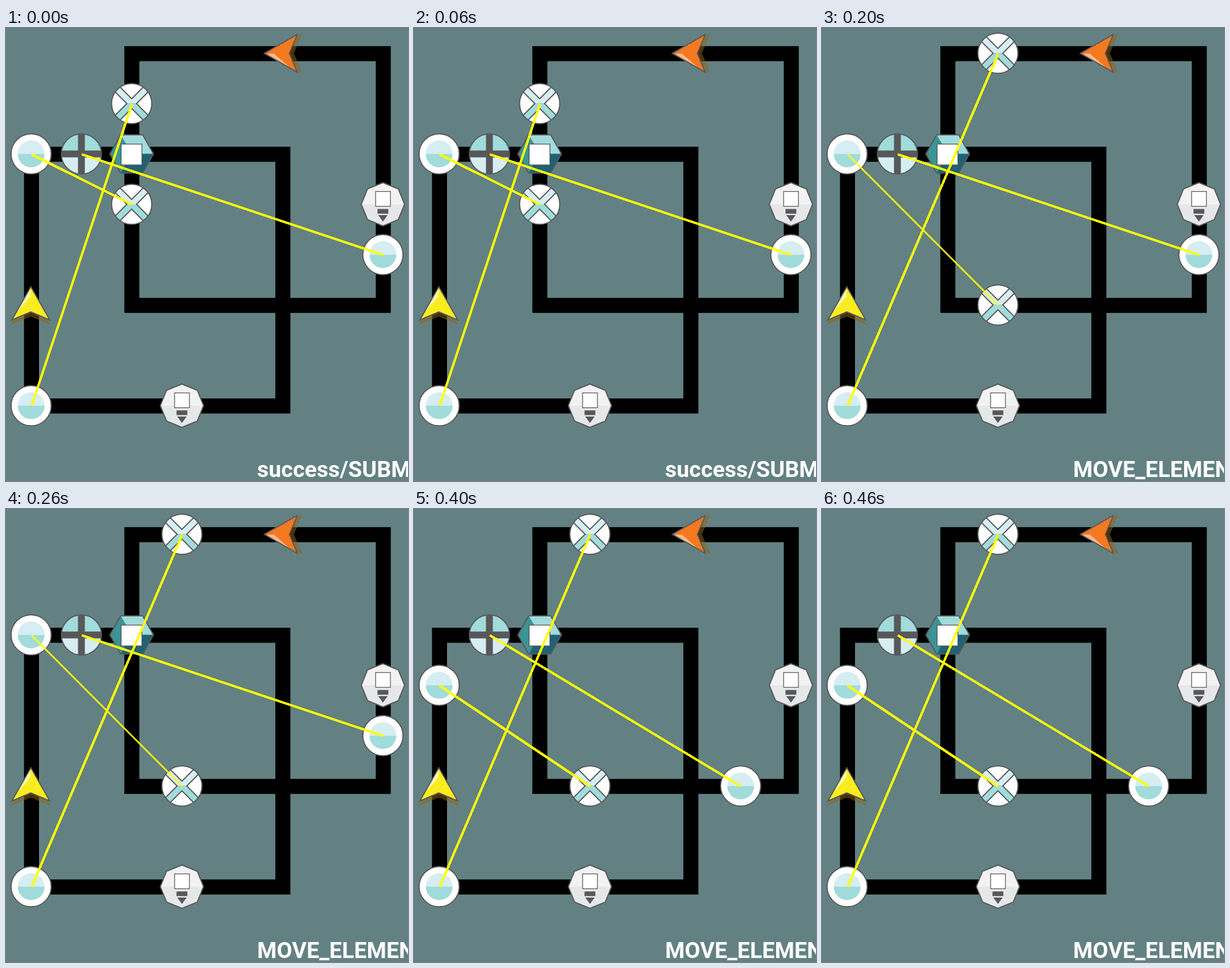
Animation, 706 px wide and 794 px high, one loop 0.5 s. Source, as an HTML page:

```html
<!DOCTYPE html>
<html lang="en">
<head>
<meta charset="utf-8">
<title>Moving elements</title>
<style>
  html, body { margin: 0; width: 100%; height: 100%; overflow: hidden; background: #638183; }
  svg { display: block; width: 706px; height: 794px; }
  text { font: 700 39.4px Roboto, sans-serif; fill: #fff; }
  .edge { stroke: #58585a; stroke-width: 2; }
  .none { fill: none; }
  .pale { fill: #d5edf3; }
  .aqua { fill: #a1dbdb; }
  .dark { fill: #58585a; }
  .white { fill: #fff; }
</style>
</head>
<body>
<svg viewBox="0 0 706 794">
  <defs>
    <clipPath id="disc"><circle r="35.3"/></clipPath>
    <clipPath id="upper"><rect x="-40" y="-40" width="80" height="40"/></clipPath>
    <clipPath id="lower"><rect x="-40" width="80" height="40"/></clipPath>
    <path id="x" d="M-30-30L30 30M30-30L-30 30"/>
    <path id="dart" d="M0 0L33.2 58L0 44L-33.2 58Z"/>

    <g id="bubble">
      <circle class="white edge" r="35.3"/>
      <path class="pale" d="M-23.6 0A23.6 23.6 0 0 1 23.6 0Z"/>
      <path class="aqua" d="M-23.6 0A23.6 23.6 0 0 0 23.6 0Z"/>
    </g>
    <g id="plus">
      <path class="aqua" d="M-35.3 0A35.3 35.3 0 0 1 35.3 0Z"/>
      <path class="pale" d="M-35.3 0A35.3 35.3 0 0 0 35.3 0Z"/>
      <path class="dark" d="M-35-6H35V6H-35ZM-6-35H6V35H-6Z"/>
      <circle class="none edge" r="35.3"/>
    </g>
    <g id="cross">
      <circle class="white" r="35.3"/>
      <g clip-path="url(#disc)">
        <use href="#x" stroke="#58585a" stroke-width="14"/>
        <g stroke-width="10">
          <use href="#x" stroke="#d5edf3" clip-path="url(#upper)"/>
          <use href="#x" stroke="#a1dbdb" clip-path="url(#lower)"/>
        </g>
      </g>
      <circle class="none edge" r="35.3"/>
    </g>
    <g id="hex">
      <path class="aqua" d="M0 0L-19.3-33.5H19.3L38.3 0Z"/>
      <path fill="#1f6273" d="M0 0H38.3L19.3 33.5H-19.3Z"/>
      <path fill="#3d9494" d="M0 0L-19.3 33.5L-38.3 0L-19.3-33.5Z"/>
      <path class="none edge" d="M-38.3 0L-19.3-33.5H19.3L38.3 0L19.3 33.5H-19.3Z"/>
      <rect class="white edge" x="-18.5" y="-17.2" width="36.5" height="36.5" style="stroke-width:1.4"/>
    </g>
    <g id="gate">
      <path fill="#f2f2f3" d="M-38 0L-27-27L0-38L27-27L38 0Z"/>
      <path fill="#e6e7e8" d="M-38 0L-27 27L0 38L27 27L38 0Z"/>
      <path class="none edge" d="M-38 0L-27-27L0-38L27-27L38 0L27 27L0 38L-27 27Z"/>
      <rect class="white edge" x="-12.8" y="-22.4" width="26" height="26" style="stroke-width:1.3"/>
      <path class="dark" d="M-9.5 8.2H9.5V16.6H-9.5ZM-8.2 19H8.4L.1 30.4Z"/>
    </g>
  </defs>

  <rect width="706" height="794" fill="#638183"/>
  <g class="none" stroke="#000" stroke-width="26.4">
    <rect x="44.8" y="221.3" width="441.4" height="441.2"/>
    <rect x="221" y="45" width="441.6" height="441.2"/>
  </g>
  <g id="pieces"></g>
  <g id="arrows"></g>
  <g id="links" stroke="#ff0" shape-rendering="crispEdges"></g>
  <text id="label" x="441" y="787"></text>
</svg>
<script>
  const STEP = 100, STEPS = 5, CELL = 88.25;
  const NS = 'http://www.w3.org/2000/svg';
  const $ = id => document.getElementById(id);
  const at = n => 44.2 + CELL * n;

  function add(parent, tag, attrs) {
    const el = document.createElementNS(NS, tag);
    for (const k in attrs) el.setAttribute(k, attrs[k]);
    return parent.appendChild(el);
  }

  // Grid cells; "to" is taken from step "on" onwards.
  const piece = (kind, from, to = from, on = 0) =>
    ({ from, to, on, el: add($('pieces'), 'use', { href: '#' + kind }) });

  const pieces = [
    piece('gate', [7, 3]),
    piece('gate', [3, 7]),
    piece('hex', [2, 2]),
    piece('bubble', [0, 7]),
    piece('cross', [2, 1], [3, 0], 1),
    piece('bubble', [0, 2], [0, 3], 3),
    piece('cross', [2, 3], [3, 5], 2),
    piece('plus', [1, 2]),
    piece('bubble', [7, 4], [6, 5], 4)
  ];
  const links = [[3, 4], [5, 6], [7, 8]].map(ends =>
    ({ ends, el: add($('links'), 'line', {}) }));

  function arrow(x, y, turn, fill, shine) {
    const g = add($('arrows'), 'g', { transform: `translate(${x} ${y}) rotate(${turn})` });
    add(g, 'use', { href: '#dart', y: 7, fill: '#96640c', stroke: '#96640c', 'stroke-width': 2, opacity: .5 });
    add(g, 'use', { href: '#dart', fill });
    add(g, 'path', { d: 'M-.5 3L-25 45L-.5 17Z', fill: shine });
    add(g, 'use', { href: '#dart', class: 'none edge' });
  }
  arrow(43.6, 453.6, 0, '#f9ed1f', '#fbf6ae');
  arrow(453.6, 44.4, -90, '#f57921', '#f9bb90');

  function draw(step) {
    const cell = p => step >= p.on ? p.to : p.from;
    for (const p of pieces) {
      const [x, y] = cell(p);
      p.el.setAttribute('transform', `translate(${at(x)} ${at(y)})`);
    }
    for (const { ends, el } of links) {
      const [a, b] = ends.map(i => cell(pieces[i]));
      const diagonal = Math.abs(a[0] - b[0]) === Math.abs(a[1] - b[1]);
      const pos = n => at(n) + .6;
      const attrs = { x1: pos(a[0]), y1: pos(a[1]), x2: pos(b[0]), y2: pos(b[1]),
        'stroke-width': diagonal ? 3 : 4.2 };
      for (const k in attrs) el.setAttribute(k, attrs[k]);
    }
    $('label').textContent = step ? 'MOVE_ELEMENT' : 'success/SUBMIT';
  }

  let start, shown = 0;
  draw(0);
  function tick(now) {
    start ??= now;
    const step = Math.floor(Math.max(0, now - start) / STEP) % STEPS;
    if (step !== shown) draw(shown = step);
    requestAnimationFrame(tick);
  }
  requestAnimationFrame(tick);
</script>
</body>
</html>
```
